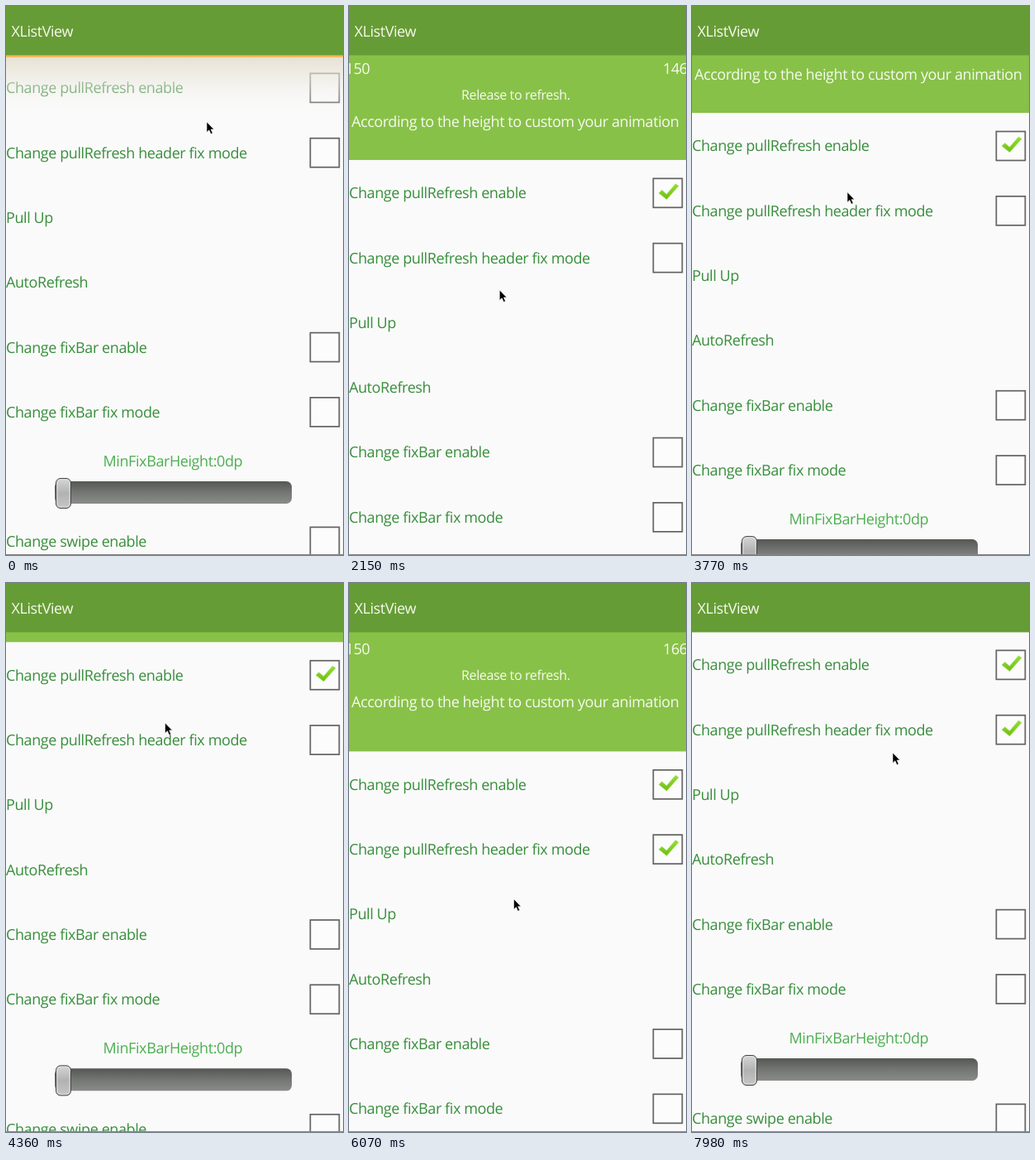
Recreate the animation shown at these times as an HTML page. Size 408 px wide and 663 px high, loop 8000 ms.

```html
<!DOCTYPE html>
<html lang="en">
<head>
<meta charset="utf-8">
<title>XListView</title>
<style>
  html, body { margin: 0; width: 100%; height: 100%; overflow: hidden; background: #fafafa; }
  svg { display: block; width: 408px; height: 663px; }
  text {
    font: 18px "Open Sans", "Noto Sans", sans-serif;
    letter-spacing: -0.023em;
    text-rendering: geometricPrecision;
    white-space: pre;
  }
  #rows text { fill: #388e3c; }
  #rows .label { fill: #4caf50; }
  #panelText text, #title { fill: #f6faef; }
  #panelText .hint { font-size: 16px; }
</style>
</head>
<body>
<svg viewBox="0 0 408 663">
  <defs>
    <linearGradient id="trackFill" x2="0" y2="1">
      <stop offset="0" stop-color="#555753"/>
      <stop offset=".5" stop-color="#747673"/>
      <stop offset="1" stop-color="#8a8c89"/>
    </linearGradient>
    <linearGradient id="thumbFill" x2="0" y2="1">
      <stop offset="0" stop-color="#d6d6d6"/>
      <stop offset=".5" stop-color="#b2b2b2"/>
      <stop offset="1" stop-color="#c6c6c6"/>
    </linearGradient>
    <linearGradient id="tickFill" x2="0" y2="1">
      <stop offset="0" stop-color="#92df35"/>
      <stop offset="1" stop-color="#70bd13"/>
    </linearGradient>
    <linearGradient id="glowFill" x2="0" y2="1">
      <stop offset="0" stop-color="#e2d9c5" stop-opacity=".8"/>
      <stop offset=".4" stop-color="#ebe8df" stop-opacity=".6"/>
      <stop offset="1" stop-color="#fafafa" stop-opacity="0"/>
    </linearGradient>
  </defs>

  <rect width="408" height="663" fill="#fafafa"/>
  <g id="rows">
    <text class="label" x="117.5" y="556">MinFixBarHeight:0dp</text>
    <rect x="59" y="574" width="287" height="27" rx="6.5" fill="url(#trackFill)"/>
    <rect x="60.5" y="570.5" width="18" height="36" rx="5.5" fill="url(#thumbFill)" stroke="#444"/>
    <rect x="62" y="572" width="15" height="33" rx="4" fill="none" stroke="#e4e4e4" stroke-opacity=".7"/>
  </g>
  <rect id="panel" y="59" width="408" fill="#88c148"/>
  <g id="panelText">
    <text x="-4.5" y="86">150</text>
    <text id="height" x="380" y="86"></text>
    <text class="hint" x="136" y="117">Release to refresh.</text>
    <text x="3" y="150">According to the height to custom your animation</text>
  </g>
  <g id="glow">
    <rect y="59" width="408" height="75" fill="url(#glowFill)"/>
    <rect y="59" width="408" height="3" fill="#f5b95f"/>
  </g>
  <rect width="408" height="59.5" fill="#669c35"/>
  <text id="title" x="6.5" y="36.5">XListView</text>
  <rect y="662" width="408" height="1" fill="#858585"/>
  <path id="cursor" d="M0 0V12.5L2.9 9.8L5 14.6L7.2 13.6L5.1 9H8.8Z" fill="#000" stroke="#fff" stroke-width=".6"/>
</svg>
<script>
const LOOP = 8000;
const PANEL_HEIGHT = 130.7;   // content stays glued to the panel's bottom edge until this height
const UNITS_PER_PX = 1.148;
const CHECK_TIMES = [620, 5030];

const $ = id => document.getElementById(id);

function add(parent, tag, attrs, content = '') {
  const node = document.createElementNS('http://www.w3.org/2000/svg', tag);
  for (const name in attrs) node.setAttribute(name, attrs[name]);
  node.textContent = content;
  parent.append(node);
  return node;
}

// Rows: caption, vertical centre, has a check box
const rows = [
  ['Change pullRefresh enable', 99, true],
  ['Change pullRefresh header fix mode', 177.3, true],
  ['Pull Up', 255.6, false],
  ['AutoRefresh', 333.9, false],
  ['Change fixBar enable', 412.2, true],
  ['Change fixBar fix mode', 490.5, true],
  ['Change swipe enable', 647, true]
];
const ticks = [];
for (const [caption, y, hasBox] of rows) {
  add($('rows'), 'text', { x: 0, y: y + 6.3 }, caption);
  if (!hasBox) continue;
  add($('rows'), 'rect', {
    x: 368.4, y: y - 17.6, width: 35, height: 35,
    fill: '#fcfcfc', stroke: '#626262', 'stroke-width': 1.7
  });
  ticks.push(add($('rows'), 'path', {
    d: `M375 ${y}l3.8-3.6 5.7 4.8 10.8-12.4 3.9 2.5-14.6 16.4z`,
    fill: 'url(#tickFill)', stroke: '#b5e67b', 'stroke-width': .7, 'stroke-linejoin': 'round'
  }));
}

// Key: [time, value, easing into this key]
const easeOut = p => 1 - (1 - p) ** 2;
function track(keys, t) {
  const next = keys.findIndex(key => key[0] > t);
  if (next < 0) return keys[keys.length - 1][1];
  if (next === 0) return keys[0][1];
  const [t0, v0] = keys[next - 1];
  const [t1, v1, ease = p => p] = keys[next];
  return v0 + (v1 - v0) * ease((t - t0) / (t1 - t0));
}

const pull = [
  [1000, 0], [1430, 34], [2600, 143, easeOut], [2990, 145.5], [3770, 70.3],
  [4000, 50, easeOut], [4180, 50], [4540, 0, easeOut],
  [5230, 0], [5830, 133], [6300, 148, easeOut], [6910, 143.6],
  [7080, 143], [7380, PANEL_HEIGHT, easeOut], [7560, PANEL_HEIGHT], [7940, 0, easeOut]
];
const cursorX = [
  [50, 243], [700, 180, easeOut], [1430, 173], [2600, 188], [4180, 188],
  [4540, 197], [4970, 197], [5200, 200], [6910, 199], [7380, 212], [7560, 212], [7980, 243]
];
const cursorY = [
  [50, 140], [550, 132], [830, 135], [890, 140], [1430, 221], [2600, 364, easeOut],
  [2990, 368], [3770, 225], [4000, 188, easeOut], [4180, 188], [4540, 150],
  [4970, 150], [5200, 144], [5830, 358], [6300, 389, easeOut], [6910, 382],
  [7380, 330], [7560, 330], [7980, 205]
];

function draw(t) {
  const offset = track(pull, t);
  $('rows').setAttribute('transform', `translate(0 ${offset})`);
  $('panel').setAttribute('height', offset);
  $('panelText').setAttribute('transform', `translate(0 ${Math.min(0, offset - PANEL_HEIGHT)})`);
  $('height').textContent = Math.round(offset * UNITS_PER_PX);
  $('glow').setAttribute('opacity', track([[50, 1], [600, 0]], t));
  ticks.forEach((tick, i) => tick.setAttribute('visibility', t >= CHECK_TIMES[i] ? 'visible' : 'hidden'));
  $('cursor').setAttribute('transform', `translate(${track(cursorX, t)} ${track(cursorY, t)})`);
}

const start = performance.now();
function frame() {
  draw((performance.now() - start) % LOOP);
  requestAnimationFrame(frame);
}
draw(0);
requestAnimationFrame(frame);
</script>
</body>
</html>
```
